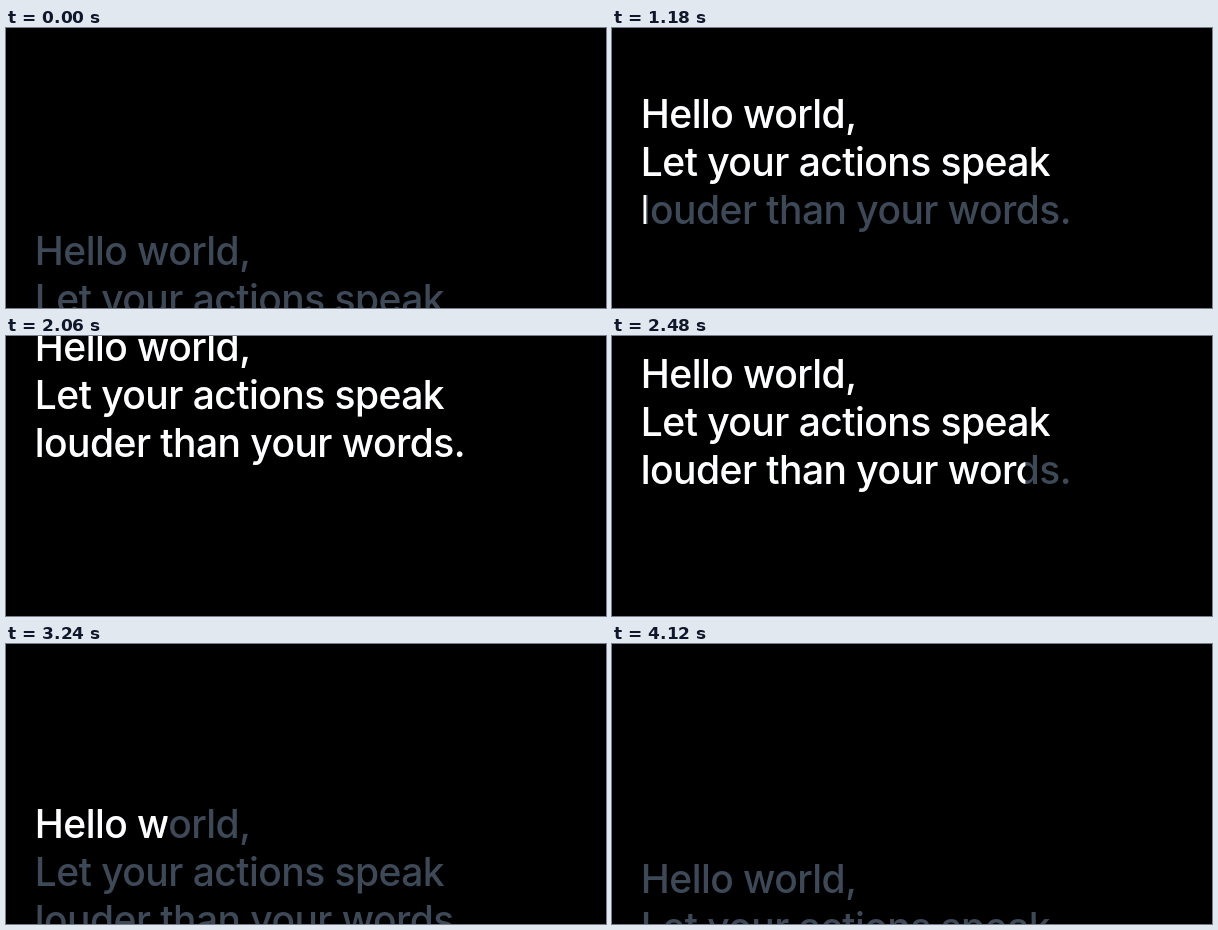
Write an HTML page that moves like this. It is 600 by 280 pixels and loops after 4.79 s.

```html
<!DOCTYPE html>
<html lang="en">
<head>
<meta charset="utf-8">
<title>Scroll text reveal</title>
<style>
  html, body { margin: 0; width: 100%; height: 100%; overflow: hidden; background: #000; }
  svg { display: block; width: 600px; height: 280px; }
  text { font: 500 39px Inter, "Liberation Sans", sans-serif; letter-spacing: -0.55px; }
</style>
</head>
<body>
<svg viewBox="0 0 600 280">
  <defs><clipPath id="reveal"></clipPath></defs>
  <rect width="600" height="280" fill="#000"/>
  <g id="page">
    <g id="dim" fill="#3e4958"></g>
    <g id="lit" fill="#fff" clip-path="url(#reveal)"></g>
  </g>
</svg>
<script>
const LOOP = 4790;
const LEFT = 30;
const LINE_HEIGHT = 48;
const FILL_LAG = 20;

const lines = [
  { text: "Hello world,", width: 211 },
  { text: "Let your actions speak", width: 411 },
  { text: "louder than your words.", width: 430 },
];

// [ms, baseline of the first line]
const scrollAt = monotoneCurve([
  [45, 237], [550, 146], [580, 145], [1120, 106], [1180, 100], [1670, 52],
  [2060, 25], [2180, 25], [2730, 98], [2790, 119], [3240, 194], [3270, 197],
  [3820, 241], [4120, 249],
]);

// [baseline of the first line, lit length running through all lines]
const fillAt = monotoneCurve([[31, 1054], [102, 626], [146.8, 347], [191.5, 132], [219, 0]]);

// Smooth interpolation through points without overshoot, held at both ends.
function monotoneCurve(points) {
  const last = points.length - 1;
  const slope = i => (points[i + 1][1] - points[i][1]) / (points[i + 1][0] - points[i][0]);
  const tangents = points.map((_, i) => {
    if (i === 0 || i === last) return 0;
    const a = slope(i - 1), b = slope(i);
    return a * b > 0 ? 2 * a * b / (a + b) : 0;
  });
  return x => {
    if (x <= points[0][0]) return points[0][1];
    if (x >= points[last][0]) return points[last][1];
    const i = points.findIndex(p => p[0] > x) - 1;
    const [x0, y0] = points[i], [x1, y1] = points[i + 1];
    const h = x1 - x0, u = (x - x0) / h, v = 1 - u;
    return y0 * (1 + 2 * u) * v * v + y1 * u * u * (3 - 2 * u)
      + h * u * v * (tangents[i] * v - tangents[i + 1] * u);
  };
}

function add(parentId, tag, attributes, content = "") {
  const node = document.createElementNS("http://www.w3.org/2000/svg", tag);
  for (const name in attributes) node.setAttribute(name, attributes[name]);
  node.textContent = content;
  return document.getElementById(parentId).appendChild(node);
}

let offset = 0;
lines.forEach((line, i) => {
  const y = i * LINE_HEIGHT;
  for (const layer of ["dim", "lit"]) add(layer, "text", { x: 28.8, y }, line.text);
  line.mask = add("reveal", "rect", { x: 0, y: y - 36, width: 0, height: LINE_HEIGHT });
  line.start = offset;
  offset += line.width;
});

const page = document.getElementById("page");

function render(time) {
  page.setAttribute("transform", `translate(0 ${Math.round(scrollAt(time))})`);
  const fill = fillAt(scrollAt(time - FILL_LAG));
  for (const { mask, start, width } of lines) {
    const lit = fill - start;
    mask.setAttribute("width", lit <= 0 ? 0 : lit >= width ? 600 : LEFT + lit);
  }
}

const began = performance.now();
function tick() {
  render((performance.now() - began) % LOOP);
  requestAnimationFrame(tick);
}
render(0);
requestAnimationFrame(tick);
</script>
</body>
</html>
```
